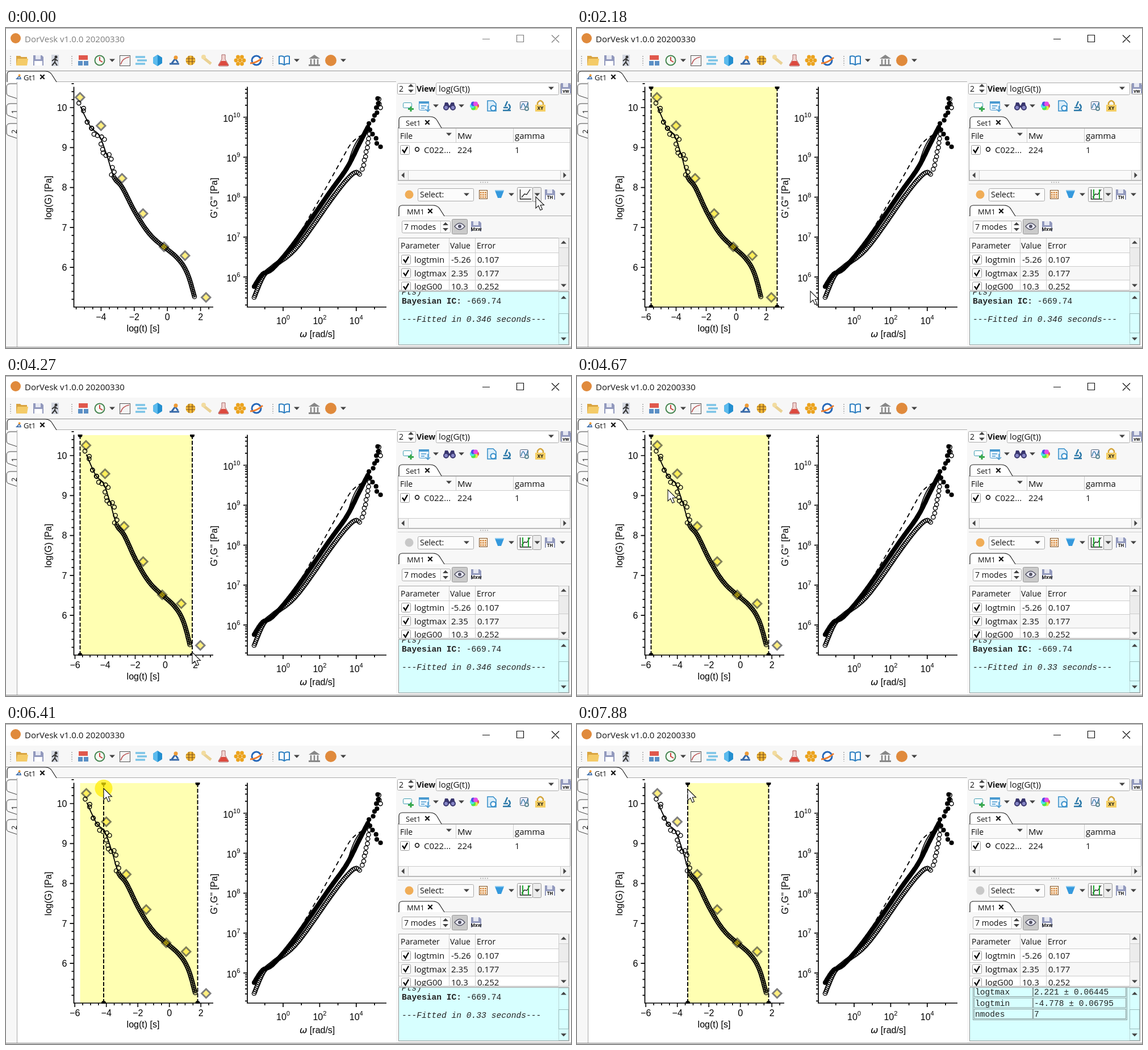
An HTML page that plays this animation: 995 px wide and 563 px high, repeating every 7.96 s.

```html
<!DOCTYPE html>
<html lang="en">
<head>
<meta charset="utf-8">
<title>Relaxation modes</title>
<style>
  html, body { margin: 0; width: 100%; height: 100%; overflow: hidden; background: #f7f7f7; }
  svg { display: block; width: 100vw; height: 100vh; }
  text { font: 15px "Open Sans", "Noto Sans", sans-serif; fill: #111; white-space: pre; }
  .s14 { font-size: 14px; }
  .s13 { font-size: 13px; }
  .bold { font-weight: bold; }
  .plot text { font: 16px "Liberation Sans", Arial, sans-serif; fill: #000; }
  .plot .omega { font: italic 16px "DejaVu Sans", sans-serif; }
  .plot .sup { font-size: 11.2px; }
  .console text { font: 14.6px "Liberation Mono", "Courier New", monospace; fill: #222; }
  .console .italic { font-style: italic; }
  .tiny { font-size: 8px; font-weight: bold; text-anchor: middle; }
</style>
</head>
<body>
<svg id="stage" viewBox="0 0 995 563" preserveAspectRatio="none"></svg>
<script>
const LOOP = 7960, FRAME = 78;

// Drawing helpers
const rect = (x, y, w, h, fill, extra = '') => `<rect x="${x}" y="${y}" width="${w}" height="${h}" fill="${fill}" ${extra}/>`;
const path = (d, fill = 'none', stroke = 'none', width = 1, extra = '') =>
  `<path d="${d}" fill="${fill}" stroke="${stroke}" stroke-width="${width}" ${extra}/>`;
const stroke = (d, color = '#aaa', width = 1, extra = '') => path(d, 'none', color, width, extra);
const disc = (x, y, r, fill, extra = '') => `<circle cx="${x}" cy="${y}" r="${r}" fill="${fill}" ${extra}/>`;
const text = (x, y, s, name = '', extra = '') => `<text x="${x}" y="${y}" class="${name}" ${extra}>${s}</text>`;
const group = (content, extra = '') => `<g ${extra}>${content}</g>`;
const at = (x, y, content) => group(content, `transform="translate(${x} ${y})"`);
const times = (n, make) => Array.from({ length: n }, (_, i) => make(i));
const box = (x, y, w, h, fill = '#fff', color = '#aaa', r = 2) => rect(x + .5, y + .5, w, h, fill, `stroke="${color}" rx="${r}"`);
const arrow = (x, y, angle = 0) => path('M-5 -2.5H5L0 2.8Z', '#444', 'none', 0, `transform="translate(${x} ${y})rotate(${angle})"`);
const spin = (x, y) => arrow(x, y - 5, 180) + arrow(x, y + 5);
const cross = (x, y) => stroke(`M${x - 3.7} ${y - 3.7}l7.4 7.4m0 -7.4l-7.4 7.4`, '#111', 2.2);
const check = (x, y) => box(x, y, 16, 16, '#fff', '#999') + stroke(`M${x + 4} ${y + 8}l3.5 5l5.5 -10`, '#000', 2.3);
const tab = (x, y, w, h, label, labelX) =>
  path(`M${x} ${y + h}v${6 - h}q0 -6 6 -6h${w - 26}q9 0 13 8l7 ${h - 8}`, '#fff', '#222', 1.2) +
  text(labelX, y + 15.5, label, 's13') + cross(x + w - 25, y + 10);
const floppy = (x, y, label) => at(x, y,
  path('M-9 -9H6L9 -6V9H-9z', '#9299bd') + rect(-5, -9, 9, 7, '#e6e8f2') + rect(-7, 1, 14, 8, '#fff') +
  (label ? text(0, 8, label, 'tiny') : ''));

// Curve helpers
const poly = pts => 'M' + pts.map(p => p.map(v => v.toFixed(1)).join(' ')).join('L');
const noise = i => { const s = Math.sin(i * 127.1 + 3) * 43758.5; return s - Math.floor(s) - .5; };
const jitter = (pts, dx, dy) => pts.map(([x, y], i) => [x + noise(i) * dx, y + noise(i + 50) * dy]);

function spline(keys) {
  const key = i => keys[Math.max(0, Math.min(keys.length - 1, i))];
  const blend = (a, b, c, d, s) => b + s * ((c - a) + s * (2 * a - 5 * b + 4 * c - d + s * (3 * b - a - 3 * c + d))) / 2;
  return times((keys.length - 1) * 10 + 1, n => {
    const i = Math.floor(n / 10);
    return [0, 1].map(k => blend(key(i - 1)[k], key(i)[k], key(i + 1)[k], key(i + 2)[k], n / 10 - i));
  });
}

// Points spaced evenly along a polyline
function spread(pts, gap) {
  const out = [];
  let left = 0;
  for (let i = 1; i < pts.length; i++) {
    const [x, y] = pts[i - 1], dx = pts[i][0] - x, dy = pts[i][1] - y, len = Math.hypot(dx, dy);
    for (; left < len; left += gap) out.push([x + dx * left / len, y + dy * left / len]);
    left -= len;
  }
  return out;
}
const rings = pts => group(pts.map(([x, y]) => disc(x.toFixed(1), y.toFixed(1), 3.6, 'none')).join(''), 'stroke="#000" stroke-width="1.4"');
const dots = pts => pts.map(([x, y]) => disc(x.toFixed(1), y.toFixed(1), 4.1, '#000')).join('');

// Left plot: log(G) against log(t); each view has its own time scale
const views = [{ scale: 29.2, zero: 284.2 }, { scale: 26.5, zero: 280.5 }, { scale: 27.75, zero: 287.7 }];
const relax = spline([[131, 138], [149, 174], [164, 189], [177, 222], [190, 262], [205, 281],
  [229, 327], [257, 367], [300, 403], [319, 431], [332, 473]]);
const early = jitter(spread(relax.filter(p => p[0] <= 190), 7), 9, 20);
const late = spread(relax.filter(p => p[0] >= 190), 3.2);
const modeY = [122, 172, 264.5, 326.5, 385, 400.5, 474];
const rowY = log => 140 + (10 - log) * 70.3;

function relaxPlot({ scale, zero }) {
  const px = v => zero + scale * v;
  const move = ([x, y]) => [px((x - views[0].zero) / views[0].scale), y];
  let ticks = '', labels = '';
  for (let v = -6; v <= 3; v += .5) {
    const x = px(v), major = v % 2 === 0;
    if (x < 119 || x > 365) continue;
    ticks += `M${x} 491v${major ? 7 : 4}`;
    if (major) labels += text(x, 514, String(v).replace('-', '−'), '', 'text-anchor="middle"');
  }
  const diamonds = modeY.map((y, i) => path(`M${px(-5.27 + i * 7.6 / 6)} ${y - 7.7}l7.7 7.7l-7.7 7.7l-7.7 -7.7z`, '#ffdf00', '#000', 3));
  return stroke(ticks, '#000', 1.6) + labels + stroke(poly(relax.map(move)), '#000', 1.8) +
    rings([...early, ...late].map(move)) + group(diamonds.join(''), 'opacity=".5"');
}

function relaxAxes() {
  const ticks = times(28, i => `M119.5 ${rowY(5.2 + i / 5)}h${(i + 1) % 5 ? -4 : -7}`).join('');
  return stroke('M119.5 103.5V491H365' + ticks, '#000', 1.7) +
    times(5, i => text(107.5, rowY(10 - i) + 5.7, 10 - i, '', 'text-anchor="end"')).join('') +
    text(241.5, 534, 'log(t) [s]', '', 'text-anchor="middle"') +
    text(0, 0, 'log(G) [Pa]', '', 'text-anchor="middle" transform="translate(80 298.5)rotate(-90)"');
}

// Right plot: moduli against frequency
const storage = spline([[437, 455], [452, 433], [470, 423], [508, 378], [568, 292], [600, 247], [622, 204], [638, 173]]);
const loss = spline([[437, 474], [453, 437], [470, 420], [512, 386], [574, 300], [600, 267], [615, 254], [624, 258]]);
const highStorage = jitter([...spread([[641, 169], [651, 152], [654, 120]], 8), ...spread([[641, 178], [658, 211]], 9)], 6, 3);
const highLoss = jitter([...spread([[628, 249], [635, 213], [640, 186], [646, 183]], 8), ...spread([[656, 125], [659, 142]], 8)], 2, 2);

function moduliPlot() {
  const decadeY = d => rowY(d) + 17, decadeX = d => 488 + d * 32.2;
  const power = (x, y, n, anchor) => text(x, y, `10<tspan class="sup" dy="-7.5">${n}</tspan>`, '', `text-anchor="${anchor}"`);
  let ticks = '', labels = '';
  for (let d = 5; d <= 10; d++) for (let m = 1; m < 10; m++) {
    const y = decadeY(d + Math.log10(m));
    if (y > 103 && y < 491) ticks += `M425 ${y}h${m === 1 ? -7 : -4}`;
  }
  for (let d = -1; d <= 5; d++) ticks += `M${decadeX(d)} 491v${d % 2 ? 4 : 7}`;
  for (let d = 6; d <= 10; d++) labels += power(412.5, decadeY(d) + 7.5, d, 'end');
  for (let d = 0; d <= 4; d += 2) labels += power(decadeX(d), 520.5, d, 'middle');
  return stroke('M425 103.5V491H670' + ticks, '#000', 1.7) + labels +
    text(517, 543.5, '<tspan class="omega">ω</tspan> [rad/s]') +
    text(0, 0, "G',G'' [Pa]", '', 'text-anchor="middle" transform="translate(371.5 299)rotate(-90)"') +
    stroke('M505 382L553 300L602 212Q612 194 632 186', '#000', 1.8, 'stroke-dasharray="8 6"') +
    stroke('M600 248Q608 215 618 199T636 182', '#000', 1.6) +
    rings([...spread(loss, 3.4), ...highLoss]) + dots([...spread(storage, 3), ...highStorage]);
}

// Window chrome
function titleBar() {
  return rect(0, 0, 995, 38, '#fff') + stroke('M0 .5H995', '#999') + disc(17, 18, 9, '#e08a3c') +
    group(text(33, 25, 'DorVesk v1.0.0 20200330') +
      stroke('M839 19.5h13M899.5 12.5h12v12h-12zM961 12.5l13 13m0 -13l-13 13', '#111', 1.2), 'id="title"');
}

const toolIcons = {
  folder: path('M-10 -8h7l2 2h10v15h-19z', '#d9a441') + path('M-8 -3h19l-2 12h-19z', '#f4cb68'),
  exit: rect(-7, -10, 13, 20, '#d3d7e0') + disc(1, -6, 2.5, '#333') + stroke('M-6 1l5 -4l5 4M0 -3l-1 6l4 6M-1 3l-5 6', '#333', 2),
  blocks: rect(-8, -9, 16, 8, '#e0584c') + rect(-9, 1, 8, 8, '#5a8fc5') + rect(1, 1, 8, 8, '#5a8fc5'),
  clock: disc(0, 0, 8.5, '#f4fbf2', 'stroke="#458450" stroke-width="2"') + stroke('M0 -6v6l5 3', '#c44', 2),
  chart: box(-9, -9, 18, 18, '#f5f5f5', '#555', 0) + stroke('M-7 7Q-4 -4 8 -6', '#b55', 1.5),
  waves: stroke('M-10 -6h17M-7 0h17M-10 6h17', '#7cc4e6', 3.5),
  gem: path('M0 -10l8 5v10l-8 5l-8 -5v-10z', '#238fd0') + path('M0 -10v20l-8 -5v-10z', '#5cbbed'),
  bench: stroke('M-8 6h17M-4 5l6 -8l5 7', '#3568a8', 3) + disc(3, -5, 3.5, '#ef9b35'),
  hive: disc(0, 0, 8.5, '#f1b735') + stroke('M-8 -3h16M-8 2h16M-3 -8v16M3 -8v16', '#80551d', 1.2),
  wand: stroke('M-8 -6l15 12', '#ead193', 5) + disc(-6, -6, 4, '#f2dca0'),
  flask: path('M-3 -10h6v8l6 10q0 2 -2 2h-14q-2 0 -2 -2l6 -10z', '#f2d5d2', '#a66') + path('M-4 1h8l5 8h-18z', '#dc4a3f'),
  beads: times(7, i => disc(i ? 7 * Math.cos(i * Math.PI / 3) : 0, i ? 7 * Math.sin(i * Math.PI / 3) : 0, 3.4, '#eba31e')).join(''),
  ring: disc(0, 0, 8, '#fff', 'stroke="#2768b8" stroke-width="3"') + stroke('M-11 5Q0 5 11 -5', '#ed7b2b', 3)
};

function toolbar() {
  const grip = x => stroke(`M${x} 49v17`, '#bbb', 2, 'stroke-dasharray="2 2"');
  const { folder, exit, ...modules } = toolIcons;
  const moduleX = i => i < 2 ? 136 + i * 29 : 151 + i * 29;
  const book = path('M-9 -7q5 -2 9 1q5 -3 9 -1v13q-5 -1 -9 2q-4 -3 -9 -2zM0 -6v13', '#fff', '#2d7fc1', 2);
  const bank = path('M-10 -3l10 -7l10 7zM-10 7h20v3h-20z', '#888') + stroke('M-6 -2v9M0 -2v9M6 -2v9', '#888', 2.5);
  return [8, 116, 470].map(grip).join('') + stroke('M0 75.5H995', '#999') +
    at(28, 57, folder) + floppy(57, 57) + at(87, 57, exit) +
    Object.values(modules).map((icon, i) => at(moduleX(i), 57, icon)).join('') +
    at(490, 57, book) + at(543, 57, bank) + disc(572, 57, 10, '#e08a3c') +
    [187, 512, 594].map(x => arrow(x, 57)).join('');
}

function plotFrame() {
  const sideTab = i => path(`M19 ${124 + i * 35}l-15 -5q-3 -1 -3 -5v-10q0 -6 7 -6h11`, '#fafafa', '#444') +
    (i ? text(0, 0, i, 's13', `transform="translate(19 ${116 + i * 35})rotate(-90)"`) : '');
  return times(3, sideTab).join('') + rect(19, 95, 668, 466, '#fff') + stroke('M19.5 561V94.5H687') +
    tab(2, 76, 87, 19, 'Gt1', 31) + at(22, 86, group(toolIcons.bench, 'transform="scale(.55)"'));
}

function dataPanel() {
  const flower = times(6, i => disc(4 * Math.cos(i * Math.PI / 3), 4 * Math.sin(i * Math.PI / 3), 4, `hsl(${i * 60} 75% 60%)`)).join('');
  const icons = [
    [708, box(-9, -6, 15, 9, '#fff', '#399bb0') + stroke('M5 1v9M0 5.5h10', '#37a84c', 3)],
    [737, box(-10, -8, 17, 15, '#e8f4fd', '#4a9ad0') + rect(-10, -8, 18, 4, '#4a9ad0') + stroke('M-6 0h9M-6 4h6M6 0v9M2 6l4 4l4 -4', '#4a9ad0', 1.5)],
    [781, path('M-8 -6h5l3 6l3 -6h5l2 9h-20z', '#39366e') + disc(-6, 3, 4, '#8787c7', 'stroke="#39366e" stroke-width="2"') + disc(6, 3, 4, '#8787c7', 'stroke="#39366e" stroke-width="2"')],
    [825, flower],
    [855, path('M-7 -9h10l5 5v13h-15z', '#dceefa', '#328cc8', 1.5) + disc(3, 4, 4.5, '#fff', 'stroke="#328cc8" stroke-width="2"')],
    [882, stroke('M-7 8h14M1 -8l-4 9M3 -3q6 6 -1 10M-6 3h8', '#2b78a8', 2.5)],
    [912, box(-7, -8, 14, 14, '#eef', '#567') + stroke('M-5 4q3 -13 6 -5t6 -5', '#367ba3', 1.5) + disc(5, 5, 3, '#fff', 'stroke="#5d8794" stroke-width="2"')],
    [941, stroke('M-5 -1v-4q5 -8 10 0v4', '#d4a63c', 2.5) + rect(-9, -2, 18, 12, '#f5cf65') + text(0, 7, 'XY', 'tiny')]
  ];
  return box(689, 97, 32, 19) + text(692, 112, '2', 's14') + spin(713, 106) + text(723, 112, 'View', 's14 bold') +
    box(757, 96, 216, 21) + text(762, 112, 'log(G(t))') + arrow(960, 106) + box(976, 97, 25, 19, '#e2e2e2') + floppy(986, 106, 'vw') +
    icons.map(([x, icon]) => at(x, 137, icon)).join('') + arrow(757, 137) + arrow(802, 137) +
    stroke('M690 175.5H995') + tab(692, 156, 75, 20, 'Set1', 704) +
    box(690, 176, 303, 92, '#fff', '#aaa', 0) + rect(691, 177, 302, 24, '#fafafa') + stroke('M691 201.5H993M792.5 177v24M893.5 177v24', '#ccc') +
    text(694, 195, 'File', 's14') + arrow(780, 187) + text(795, 195, 'Mw') + text(896, 195, 'gamma') +
    check(694, 206) + disc(724, 213.5, 3.4, '#fff', 'stroke="#000" stroke-width="1.5"') +
    text(736, 220, 'C022...') + text(795, 220, '224') + text(896, 220, '1') +
    box(691, 250, 302, 17, '#f3f3f3', '#ccc', 0) + box(708, 250, 268, 17, '#fafafa', '#ccc', 0) + arrow(699, 259, 90) + arrow(984, 259, -90) +
    stroke('M835 271.5h16', '#aaa', 1.5, 'stroke-dasharray="2 2"');
}

function theoryPanel() {
  const rows = [['logtmin', '-5.26', '0.107'], ['logtmax', '2.35', '0.177'], ['logG00', '10.3', '0.252']].map(([name, value, error], i) => {
    const y = 413 + i * 23.7;
    return check(696, y - 14) + text(719, y, name) + text(784, y, value) + text(830, y, error);
  });
  return stroke('M690 274.5H995', '#ccc') + disc(710, 293, 7.5, '#f0ad57', 'id="run"') +
    box(725, 282, 98, 22, '#fcfcfc') + text(729, 298, 'Select:', 's14') +
    box(833, 285, 14, 15, '#fff5e5', '#7d4d20', 0) + stroke('M835 289.5h11m-11 4h11m-11 4h11', '#d07b2d', 2.5, 'stroke-dasharray="2.5 1.5"') +
    path('M861 286h16l-5 13h-6z', '#3599dd') + rect(861, 285, 16, 2, '#8ecbf0') +
    box(900, 280, 27, 25, '#fafafa', '#999') + box(927, 280, 15, 25, '#ececec', '#999') +
    stroke('M905.5 284v17H925M908 298l5 -6l4 1l6 -9', '#222', 1.3) + stroke('M910 284v17M920 284v17', '#20a830', 2, 'id="limitIcon"') +
    floppy(958, 293, 'TH') + [811, 890, 935.5, 980].map(x => arrow(x, 293)).join('') +
    stroke('M690 330.5H995') + tab(692, 312, 80, 19, 'MM1', 706) +
    box(697, 339, 85, 21) + text(701, 355, '7 modes', 's14') + stroke('M765.5 340v20', '#ccc') + spin(774, 349.5) +
    box(785, 336, 27, 26, '#cacaca', '#999') + path('M790 349q9 -11 18 0q-9 11 -18 0z', '#eef', '#556', 1.5) + disc(799, 349, 3, '#556') + floppy(828, 349, 'Mxw') +
    box(691, 369, 300, 92, '#fff', '#aaa', 0) + rect(692, 370, 281, 25, '#fafafa') + rect(692, 420, 281, 23, '#f7f7f7') +
    stroke('M692 395.5h282m-282 24h282m-282 24h282M780.5 370v92M826.5 370v92', '#ccc') +
    text(695, 388, 'Parameter', 's14') + text(782, 388, 'Value', 's14') + text(829, 388, 'Error', 's14') +
    group(rows.join(''), 'clip-path="url(#tableClip)"') +
    box(973, 369, 17, 92, '#f3f3f3', '#ccc', 0) + box(973, 386, 17, 32, '#ececec', '#ccc', 0) + arrow(982, 377, 180) + arrow(982, 453) +
    box(691, 463, 300, 94, '#d7ffff', '#999', 0) + box(973, 464, 17, 92, '#d7ffff', '#b9d5d5', 0) + box(973, 502, 17, 34, '#d7ffff', '#9bb', 0) + arrow(982, 474, 180) + arrow(982, 547);
}

function consoles() {
  const report = (id, seconds) => group(text(697, 469, 'Pts)', 'italic') +
    text(697, 485, '<tspan class="bold">Bayesian IC:</tspan> -669.74') +
    text(697, 517, `---Fitted in ${seconds} seconds---`, 'italic'), `id="${id}"`);
  const cells = [['logtmax', '2.221 ± 0.06445'], ['logtmin', '-4.778 ± 0.06795'], ['nmodes', '7']].map(([name, value], i) => {
    const y = 462 + i * 19.5;
    return box(699, y, 103, 17, 'none', '#899', 0) + box(803, y, 163, 17, 'none', '#899', 0) + text(701, y + 14, name) + text(805, y + 14, value);
  });
  const table = group(box(697, 455, 271, 65, 'none', '#899', 0) + cells.join(''), 'id="table"');
  return group(report('firstReport', '0.346') + report('secondReport', '0.33') + table, 'class="console" clip-path="url(#consoleClip)"');
}

const limit = id => group(stroke('M0 104V491', '#000', 1.9, 'stroke-dasharray="7 3"') + disc(0, 104, 4, '#000') + disc(0, 491, 4, '#000'), `id="${id}"`);
const menu = group(box(900, 310, 100, 54, '#f4f4f4', '#aaa', 0) + rect(902, 313, 98, 24, '#cfe6f8', 'id="hover"') +
  stroke('M907 317v16h15M912 317v16M918 317v16M907 342v16h15M907 347h15M907 353h15', '#287c3a', 1.4) +
  text(929, 331, 'Vertical', 's14') + text(929, 356, 'Horizontal', 's14'), 'id="menu"');
const clip = (id, ...area) => `<clipPath id="${id}">${rect(...area, '#000')}</clipPath>`;

document.getElementById('stage').innerHTML =
  clip('tableClip', 691, 370, 282, 91) + clip('consoleClip', 692, 464, 281, 93) + clip('axesClip', 120, 103, 246, 389) +
  titleBar() + toolbar() + plotFrame() +
  group(rect(0, 104, 0, 387, '#ffffb2', 'id="span"') + relaxAxes() + views.map((v, i) => group(relaxPlot(v), `id="view${i}"`)).join('') +
    group(limit('left') + limit('right'), 'id="limits" clip-path="url(#axesClip)"') + moduliPlot(), 'class="plot"') +
  dataPanel() + theoryPanel() + consoles() + stroke('M0 561.5H995', '#777') + menu +
  disc(0, 0, 15.5, '#ffeb00', 'id="click" opacity=".72"') +
  path('M0 0V20L4.7 15.7L8 23.5L11.5 22L8.2 14.5H14.5Z', '#fff', '#111', 1.1, 'id="pointer"');

const el = {};
document.querySelectorAll('[id]').forEach(node => el[node.id] = node);

// Pointer moves: start, end, target position. The button is down during presses.
const moves = [
  [610, 930, 942, 326], [1640, 2180, 411, 463], [2330, 2890, 352.5, 487], [3270, 3650, 324, 486], [3970, 3970, 328, 486],
  [4420, 4670, 160, 200], [4840, 5470, 130.5, 106], [5860, 6640, 187.5, 116], [6710, 7170, 195, 114.5]
];
const presses = [[160, 390], [1250, 1390], [2960, 4200], [5550, 7650]];
const pressed = t => presses.some(([down, up]) => t >= down && t < up);

function pointerAt(t) {
  let x = 933, y = 297;
  for (const [start, end, toX, toY] of moves) {
    if (t < start) break;
    const steps = Math.round((end - start) / FRAME) + 1;
    const gap = (end - start) / (steps - 1) || 1;
    const done = Math.min(1, (Math.floor((t - start) / gap + 1e-6) + 1) / steps);
    const eased = pressed(start) ? done : 1 - (1 - done) ** 1.6;
    x += (toX - x) * eased;
    y += (toY - y) * eased;
  }
  return [x, y];
}

const show = (node, on) => node.style.display = on ? '' : 'none';
const place = (node, x, y) => node.setAttribute('transform', `translate(${x} ${y})`);

function render(t) {
  const [x, y] = pointerAt(t), within = (a, b) => t >= a && t < b;
  place(el.pointer, x, y);
  place(el.click, x, y);
  show(el.click, pressed(t));
  el.title.setAttribute('opacity', t < 160 ? .55 : 1);

  show(el.menu, within(230, 1390));
  el.menu.setAttribute('opacity', t < 390 ? .8 : 1);
  show(el.hover, t >= 690);

  const view = t < 1480 ? 0 : t < 4340 ? 1 : 2;
  views.forEach((_, i) => show(el['view' + i], i === view));
  [el.limits, el.span, el.limitIcon].forEach(node => show(node, view > 0));
  place(el.left, t < 5860 ? 130.5 : x, 0);
  place(el.right, t < 3270 ? 352.5 : view === 1 ? x : 337.5, 0);
  const spanLeft = t < 7720 ? 130.5 : 195;
  const spanRight = t < 4270 ? 352.5 : view === 1 ? 328 : 337.5;
  el.span.setAttribute('x', spanLeft);
  el.span.setAttribute('width', spanRight - spanLeft);

  el.run.setAttribute('fill', within(4270, 4420) || t >= 7720 ? '#c8c8c8' : '#f0ad57');
  show(el.firstReport, t < 4420);
  show(el.secondReport, within(4420, 7800));
  show(el.table, t >= 7800);
}

function tick() {
  render(performance.now() % LOOP);
  requestAnimationFrame(tick);
}
tick();
</script>
</body>
</html>
```
